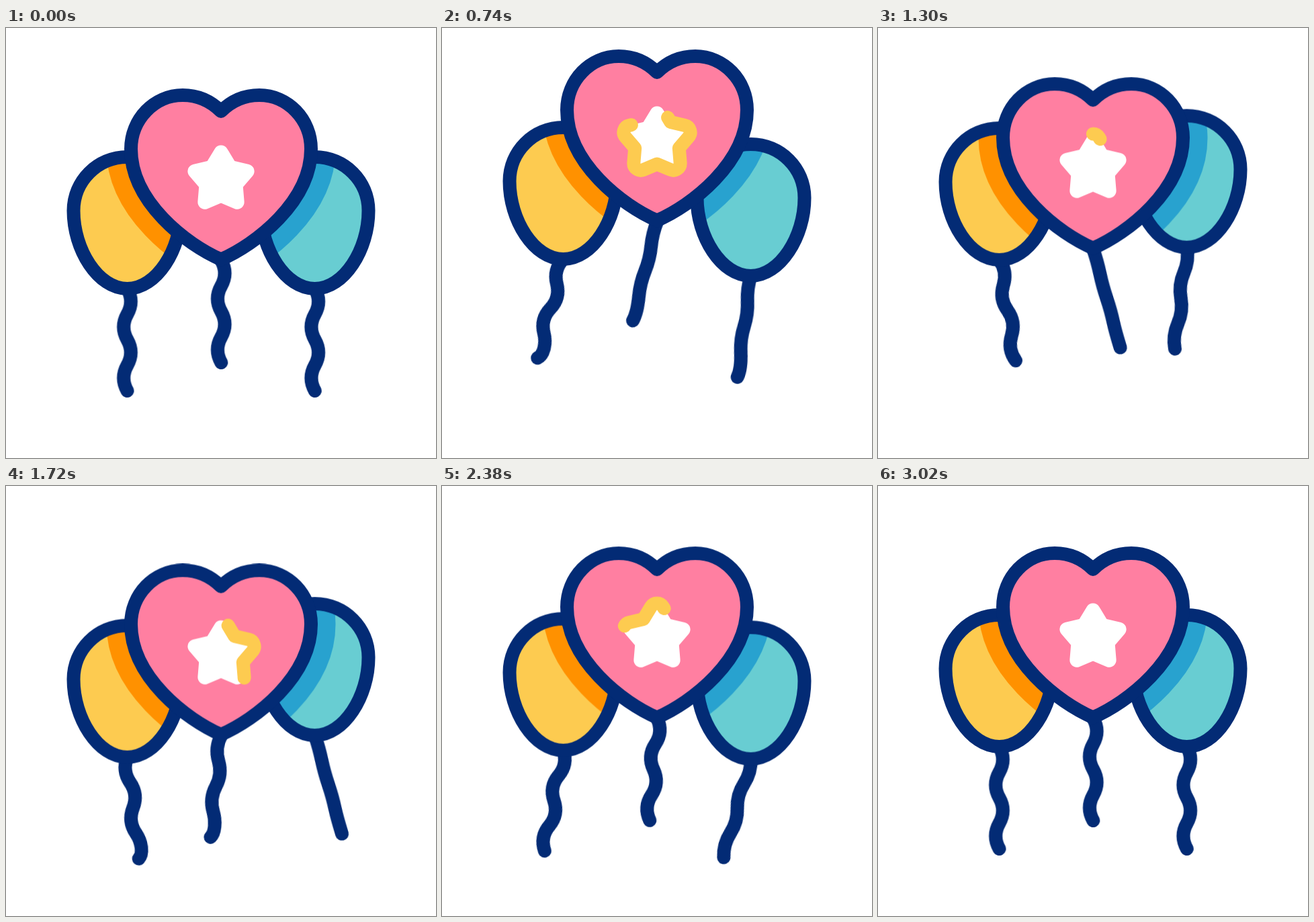
An HTML page that plays this animation: 640 px wide and 640 px high, repeating every 3600 ms.

```html
<!DOCTYPE html>
<html lang="en">
<head>
<meta charset="utf-8">
<title>Balloons</title>
<style>
  @property --from { syntax: "<number>"; inherits: false; initial-value: 0; }
  @property --to { syntax: "<number>"; inherits: false; initial-value: 0; }

  html, body { margin: 0; width: 100%; height: 100%; overflow: hidden; background: #fff; }
  svg { display: block; width: 100%; height: 100%; --delay: 0ms; }

  .left { --delay: 180ms; }
  .right { --delay: 420ms; }
  .lead { --delay: 0ms; }

  .line { fill: none; stroke: #032b75; stroke-width: 20; stroke-linecap: round; stroke-linejoin: round; }
  .shade { stroke-width: 73; stroke-linejoin: round; }

  .bob, .unbob, .swing, .wave, .trim {
    animation: 3600ms cubic-bezier(.3333, 0, .6667, 1) var(--delay) infinite;
  }
  .bob { animation-name: bob; }
  .unbob { animation-name: unbob; }
  .swing { animation-name: swing; }
  .wave {
    animation-name: wave;
    d: path("M0 0C7.3 13 7.3 25 0 38S-7.3 63 0 76S7.3 101 0 114S-7.3 139 0 152");
  }
  .trim {
    animation-name: trim, blink;
    animation-timing-function: cubic-bezier(.3333, 0, .6667, 1), step-end;
    fill: none;
    stroke: #fdcb50;
    stroke-width: 20;
    stroke-linecap: round;
    stroke-linejoin: round;
    stroke-dasharray: calc((var(--to) - var(--from)) * 1px) 300px;
    stroke-dashoffset: calc(var(--from) * -1px);
  }

  @keyframes bob {
    0%, 66.944%, 100% { transform: translateY(0); }
    24.056% { transform: translateY(-61.5px); }
    47.778% { transform: translateY(25.5px); }
  }
  /* Cancels a balloon's own bob so its shade can follow the heart. */
  @keyframes unbob {
    0%, 66.944%, 100% { transform: translateY(0); }
    24.056% { transform: translateY(61.5px); }
    47.778% { transform: translateY(-25.5px); }
  }
  @keyframes swing {
    0%, 72.222%, 100% { transform: rotate(0deg); }
    18.056%, 54.444% { transform: rotate(15.4deg); }
    36.389% { transform: rotate(-15.4deg); }
  }
  @keyframes wave {
    0%, 28.889%, 58.889%, 100% {
      d: path("M0 0C7.3 13 7.3 25 0 38S-7.3 63 0 76S7.3 101 0 114S-7.3 139 0 152");
    }
    14.722%, 44.444% {
      d: path("M0 0C-7.3 13 -7.3 25 0 38S7.3 63 0 76S-7.3 101 0 114S8.5 145 0 152");
    }
  }
  @keyframes trim {
    0%, 6.111% { --to: 0; }
    26.389%, 39% { --to: 100; }
    39.01%, 40% { --to: 0; }
    60.278%, 100% { --to: 100; }
    0%, 18.389% { --from: 0; }
    38.667%, 39% { --from: 100; }
    39.01%, 52.222% { --from: 0; }
    72.556%, 100% { --from: 100; }
  }
  @keyframes blink {
    0%, 38.667%, 72.556%, 100% { opacity: 0; }
    6.111%, 40% { opacity: 1; }
  }
</style>
</head>
<body>
<svg viewBox="0 0 640 640">
  <defs>
    <path id="heart" d="M320 124C305 109 285 100 263 100C220.500 100 186 136 186 180C186 259 269 322.500 320 344.500C371 322.500 454 259 454 180C454 136 419.500 100 377 100C355 100 335 109 320 124Z"/>
    <path id="egg" d="M100.500 272C100.500 228 136 192 180.500 192S260.500 228 260.500 272C260.500 330 224 388 180.500 388S100.500 330 100.500 272Z"/>
    <clipPath id="inEgg"><use href="#egg"/></clipPath>
  </defs>

  <g class="left">
    <g class="bob">
      <g transform="translate(180.500 388)"><g class="swing"><path class="line wave"/></g></g>
      <g clip-path="url(#inEgg)">
        <use href="#egg" fill="#fdcb50"/>
        <g class="unbob"><g class="lead bob"><use href="#heart" class="shade" fill="#ff9100" stroke="#ff9100"/></g></g>
      </g>
      <use href="#egg" class="line"/>
    </g>
  </g>

  <g class="right">
    <g class="bob">
      <g transform="translate(459.700 388)"><g class="swing"><path class="line wave"/></g></g>
      <g transform="matrix(-1 0 0 1 640 0)">
        <g clip-path="url(#inEgg)">
          <use href="#egg" fill="#68cdd2"/>
          <g class="unbob"><g class="lead bob"><use href="#heart" class="shade" fill="#28a2cf" stroke="#28a2cf"/></g></g>
        </g>
        <use href="#egg" class="line"/>
      </g>
    </g>
  </g>

  <g class="bob">
    <g transform="translate(320.300 346)"><g class="swing"><path class="line wave"/></g></g>
    <use href="#heart" fill="#ff7fa1"/>
    <use href="#heart" class="line"/>
    <g transform="translate(320 226)">
      <path class="star" fill="#fff"/>
      <path class="star trim" pathLength="100"/>
    </g>
  </g>
</svg>
<script>
  // Five-pointed star with rounded tips, clockwise from just below the top tip.
  const polar = (radius, degrees) => {
    const a = degrees * Math.PI / 180;
    return `${(radius * Math.sin(a)).toFixed(2)} ${(-radius * Math.cos(a)).toFixed(2)}`;
  };
  const tip = 47.36, notch = 34.5, spread = 10.95, round = 10.5;
  const start = polar(45.2, 13.6);
  let outline = `M${start}`;
  for (let a = 0; a < 360; a += 72) {
    outline += `L${polar(notch, a + 36)}L${polar(tip, a + 72 - spread)}`
      + `A${round} ${round} 0 0 1 ${polar(tip, a + 72 + spread)}`;
  }
  outline += `L${start}`;
  document.querySelectorAll(".star").forEach(path => path.setAttribute("d", outline));
</script>
</body>
</html>
```
